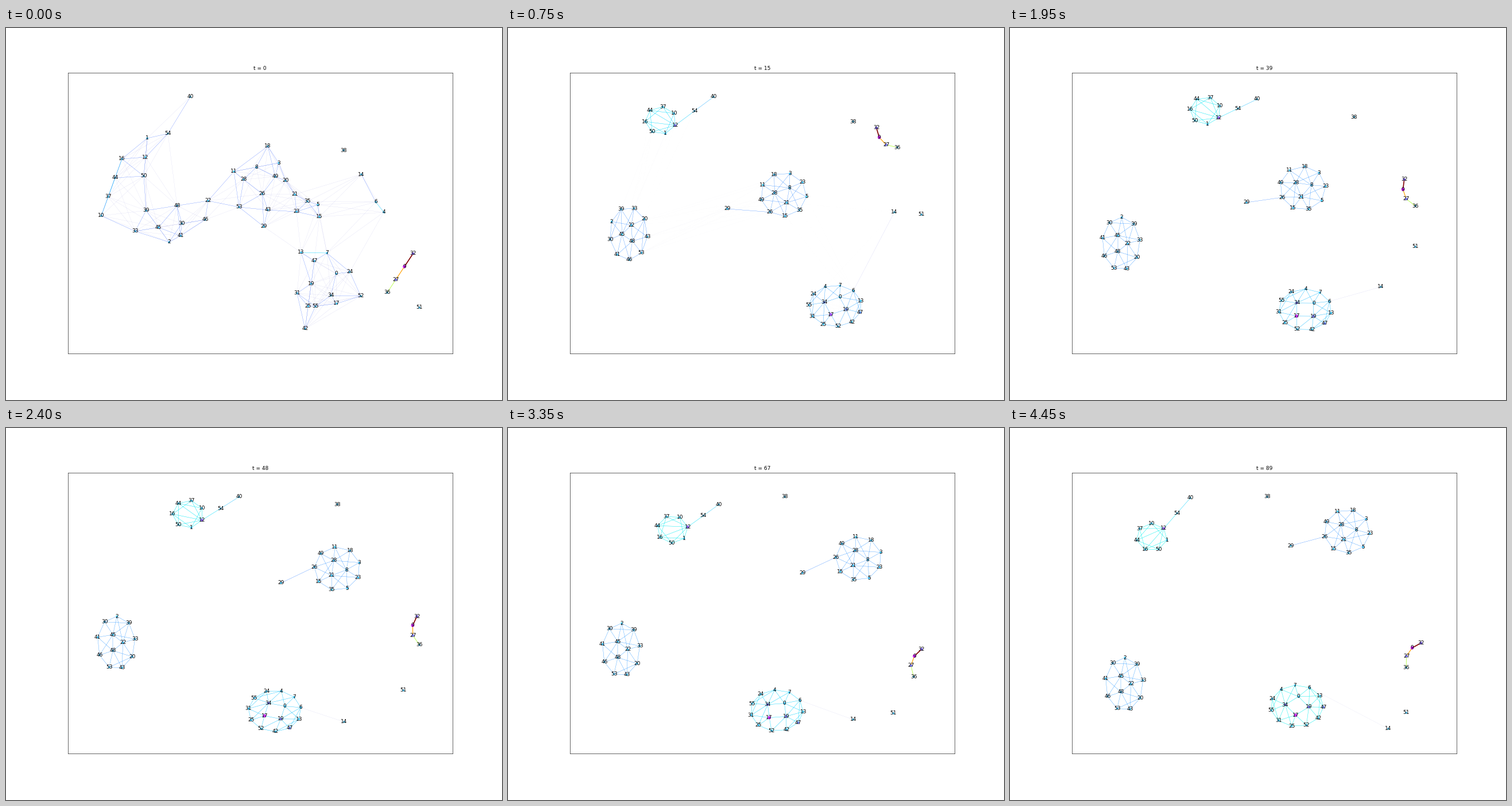
A matplotlib script for the animation above (4500 ms loop, 864 by 648 pixels).

```python
import matplotlib.pyplot as plt
import numpy as np
from matplotlib.animation import FuncAnimation
from matplotlib.collections import LineCollection

FRAMES, INTERVAL = 90, 50
LAST = FRAMES - 1
NODES = 56
WIDTH, HEIGHT = 864, 648
JET, COOL = plt.get_cmap("jet"), plt.get_cmap("cool")

plt.rcParams["font.family"] = "DejaVu Sans"

# Positions are complex numbers in pixels, y pointing down.
start = np.zeros(NODES, complex)


def strand(nodes, first, last=0):
    """Space nodes evenly along a line of the opening chain."""
    start[nodes] = np.linspace(first, last, len(nodes))


strand([16, 44, 37, 10], 202 + 228j, 166 + 327j)
strand([40, 54], 321 + 120j, 282 + 184j)
strand([1, 12, 50], 246 + 192j, 240 + 258j)
strand([39, 48, 22], 244 + 318j, 352 + 301j)
strand([33, 45, 30, 46], 225 + 354j, 347 + 334j)
strand([2, 41], 284 + 373j, 304 + 362j)
strand([11, 8, 3], 397 + 250j, 475 + 235j)
strand([28, 49], 414 + 264j, 469 + 259j)
strand([53, 26, 20], 406 + 312j, 487 + 266j)
strand([18, 21], 456 + 206j, 503 + 290j)
strand([29, 43], 449 + 346j, 456 + 317j)
strand([35, 5], 525 + 302j, 543 + 308j)
strand([23, 15], 506 + 320j, 546 + 329j)
strand([38, 14], 588 + 213j, 619 + 255j)
strand([6, 4], 644 + 303j, 658 + 321j)
strand([13, 7], 514 + 391j, 559 + 392j)
strand([47, 19, 25, 42], 537 + 406j, 521 + 524j)
strand([31, 55], 507 + 462j, 539 + 485j)
strand([17, 52], 576 + 480j, 618 + 467j)
strand([0, 34], 575 + 428j, 566 + 466j)
strand([24], 599 + 425j)
strand([32, 9, 27, 36], 709 + 393j, 664 + 461j)
strand([51], 720 + 487j)


def ring(count, angle, radius=1.0):
    return radius * np.exp(1j * (np.radians(angle) + 2 * np.pi * np.arange(count) / count))


class Community:
    """A fixed shape whose centre drifts while it turns."""

    def __init__(self, nodes, shape, size, xs, ys, turns):
        self.nodes, self.shape, self.size = nodes, shape, size
        self.path, self.turns = np.array(xs) + 1j * np.array(ys), turns

    def centre(self, t):
        return np.interp(t, KEYS, self.path)

    def place(self, t):
        z = self.shape * np.exp(1j * np.radians(np.interp(t, KEYS, self.turns)))
        return self.centre(t) + self.size[0] * z.real + 1j * self.size[1] * z.imag


KEYS = [15, 30, 48, 58, 77, 89]

top_left = Community(
    [37, 10, 12, 1, 50, 16, 44], ring(7, 218), (27, 24),
    [266, 364, 317, 297, 275, 247], [161, 138, 150, 168, 186, 190],
    [60, 75, 65, 46, 10, 0])
left = Community(
    [30, 2, 39, 33, 20, 43, 53, 46, 41, 45, 22, 48],
    np.append(ring(9, 232), ring(3, 240, 0.35)), (33, 46),
    [210, 195, 192, 196, 198, 199], [358, 377, 374, 377, 396, 446],
    [-65, 0, 0, 0, 0, 0])
middle = Community(
    [26, 49, 11, 18, 3, 23, 5, 35, 15, 28, 8, 21],
    np.append(ring(9, 166), ring(3, 230, 0.4)), (40, 38),
    [480, 443, 577, 616, 605, 587], [290, 313, 245, 236, 218, 180],
    [-40, -40, 18, 22, 12, 0])
bottom = Community(
    [24, 4, 7, 6, 13, 47, 42, 52, 25, 31, 55, 34, 0, 19, 17],
    np.append(ring(11, 200), ring(4, 187, 0.45)), (46, 36),
    [570, 560, 468, 456, 482, 500], [484, 488, 493, 494, 490, 484],
    [15, 25, 52, 57, 5, 0])
chain = Community(
    [32, 9, 27, 36], np.array([-1, -0.4 + 0.35j, 0.3 + 0.4j, 1]), (25, 25),
    [660, 675, 718, 714, 713, 703], [191, 221, 353, 415, 403, 396],
    [43, 49, 85, 106, 106, 121])
communities = [top_left, left, middle, bottom, chain]


def loner(node, xs, ys):
    communities.append(Community([node], np.zeros(1), (0, 0), xs, ys, [0] * 6))


loner(14, [673, 703, 589, 577, 628, 659], [321, 390, 512, 515, 500, 524])
loner(38, [601, 622, 577, 492, 471, 448], [163, 177, 133, 120, 120, 120])
loner(51, [720, 720, 692, 665, 678, 690], [325, 305, 457, 505, 488, 496])
loner(40, [358, 455, 406, 382, 351, 314], [120, 128, 120, 129, 138, 122])


def settled(t):
    p = np.zeros(NODES, complex)
    for c in communities:
        p[c.nodes] = c.place(t)
    p[54] = (p[12] + p[40]) / 2
    p[29] = middle.centre(t) - 98 + 25j
    return p


def layout(t):
    u = min(1, t / KEYS[0])
    ease = 1 - (1 - u) ** 2
    return start + (settled(max(t, KEYS[0])) - start) * ease


# (a, b) -> weights at the start, after separating and at the end
links = {}


def link(a, b, **changes):
    entry = links.setdefault((min(a, b), max(a, b)), dict(first=0, mid=0, end=0))
    entry.update(changes)


def link_nearest(points, nodes, count, reach, **changes):
    for a in nodes:
        order = sorted((abs(points[a] - points[b]), b) for b in nodes if b != a)
        for distance, b in order[:count]:
            if distance < reach:
                link(a, b, **changes)


opening = [n for n in range(NODES) if n not in (*chain.nodes, 38, 51)]
link_nearest(start, opening, 8, 130, first=0.05)
link_nearest(start, opening, 3, 75, first=0.19)
for a, b in [(16, 44), (44, 37), (37, 10), (6, 4), (13, 7)]:
    link(a, b, first=0.33)
for a, b in [(40, 54), (54, 12), (50, 39), (22, 11), (11, 18)]:
    link(a, b, first=0.18)

final = settled(LAST)
for group, mid, end in [(top_left, 0.35, 0.36), (left, 0.24, 0.26),
                        (middle, 0.24, 0.25), (bottom, 0.26, 0.36)]:
    link_nearest(final, group.nodes, 4, 100, mid=mid, end=end)
for n in top_left.nodes:
    if n != 12:
        link(12, n, mid=0.35, end=0.36)
link(54, 12, mid=0.33, end=0.35)
link(40, 54, mid=0.28, end=0.33)
link(26, 29, mid=0.22, end=0.23)
link(6, 14, mid=0.06, end=0.04)
for a, b, w in [(9, 32, 1), (9, 27, 0.74), (27, 36, 0.57)]:
    link(a, b, first=w, mid=w, end=w)

edges = np.array(list(links))
edge_weights = np.array([[e["first"], e["mid"], e["end"]] for e in links.values()])


def weights_at(t):
    first, mid, end = edge_weights.T
    fade = np.exp(-t / 5)
    return first * fade + (mid + (end - mid) * t / LAST) * (1 - fade)


hub_strength = {12: 0.6, 17: 0.8, 34: 0.5, 19: 0.5, 47: 0.45}


def hubs_at(t):
    hubs = np.full(NODES, 0.22)
    hubs[[9, 32, 27]] = 0.85, 0.55, 0.5
    for n, strength in hub_strength.items():
        hubs[n] += (strength - hubs[n]) * min(1, t / 20)
    return hubs


fig = plt.figure(figsize=(16, 12), dpi=54, facecolor="white")
box = [0.125, 0.125, 0.775, 0.755]
ax = fig.add_axes(box)
ax.set(xlim=(box[0] * WIDTH, (box[0] + box[2]) * WIDTH),
       ylim=((1 - box[1]) * HEIGHT, (1 - box[1] - box[3]) * HEIGHT),
       xticks=[], yticks=[])
title = ax.set_title("", fontsize=12)
lines = ax.add_collection(LineCollection([], zorder=1), autolim=False)
dots = ax.scatter(np.zeros(NODES), np.zeros(NODES), zorder=2, linewidths=0)
labels = [ax.text(0, 0, str(n), fontsize=12, ha="center", va="center")
          for n in range(NODES)]


def update(t):
    z = layout(t)
    points = np.column_stack([z.real, z.imag])
    w, hubs = weights_at(t), hubs_at(t)
    lines.set_segments(points[edges])
    lines.set_color(JET(w))
    lines.set_linewidth(2.2 * w ** 1.2)
    dots.set_offsets(points)
    dots.set_sizes((3.4 + 5 * hubs) ** 2)
    dots.set_facecolor(COOL(hubs))
    for label, point in zip(labels, points):
        label.set_position(point)
    title.set_text(f"t = {t}")
    return [lines, dots, title, *labels]


anim = FuncAnimation(fig, update, frames=FRAMES, interval=INTERVAL,
                     repeat=True, repeat_delay=0, blit=False)
plt.show()
```
